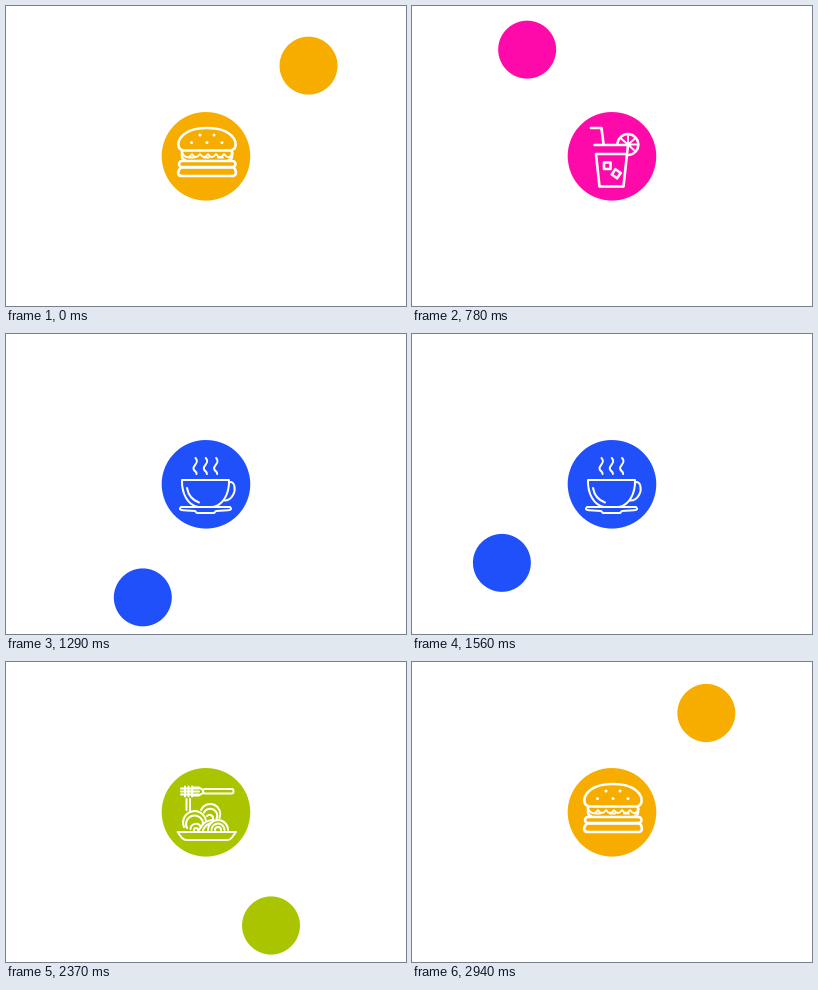
Recreate the animation shown at these times as an HTML page. Size 400x300 px, loop 2970 ms.

```html
<!DOCTYPE html>
<html lang="en">
<head>
<meta charset="utf-8">
<title>Menu blobs</title>
<style>
  html, body { margin: 0; width: 100%; height: 100%; overflow: hidden; background: #fff; }
  svg { display: block; width: 400px; height: 300px; }
  .icon { fill: none; stroke: #fff; stroke-width: 2; stroke-linecap: round; stroke-linejoin: round; }
  .bold { stroke-width: 2.6; }
  .fine { stroke-width: 1.8; }
  .dot { fill: #fff; stroke: none; }
</style>
</head>
<body>
<svg viewBox="0 0 400 300">
  <defs>
    <filter id="goo" filterUnits="userSpaceOnUse" x="0" y="0" width="400" height="300" color-interpolation-filters="sRGB">
      <feGaussianBlur stdDeviation="5"/>
      <feColorMatrix values="1 0 0 0 0  0 1 0 0 0  0 0 1 0 0  0 0 0 12 -5.5"/>
    </filter>
    <linearGradient id="tint" gradientUnits="userSpaceOnUse" x1="75" y1="0" x2="-75" y2="0">
      <stop/><stop offset=".25"/><stop offset=".75"/><stop offset="1"/>
    </linearGradient>
  </defs>

  <g filter="url(#goo)">
    <g id="stage" fill="url(#tint)">
      <circle id="main"/>
      <circle class="ball"/><path class="neck"/>
      <circle class="ball"/><path class="neck"/>
    </g>
  </g>

  <!-- burger -->
  <g class="icon bold">
    <path d="M177 144.500C171 143 171.500 136 174.500 132C180 124.500 190 122 201 122S222 124.500 227.500 132C230.500 136 231 143 225 144.500Z"/>
    <path d="M176 145V150Q176 153.500 179 154M226 145V150Q226 153.500 223 154"/>
    <path class="fine" d="M176 147q5 8 10 1q4 6 8 0q4 6 8 0q4 6 8 0q4 6 8 0q5 7 9-1M183 151.500h5M198 151.500h5M212 151.500h5"/>
    <rect x="173" y="155" width="56.500" height="6" rx="3"/>
    <path d="M175 161.500H228Q230.500 165 229.800 168Q229 170 226 170H176Q173 170 172.300 168Q171.500 165 175 161.500Z"/>
    <g class="dot">
      <circle cx="194" cy="129" r="1.500"/><circle cx="208" cy="129" r="1.500"/>
      <circle cx="185.500" cy="136.500" r="1.500"/><circle cx="201" cy="136.500" r="1.500"/><circle cx="216" cy="136.500" r="1.500"/>
    </g>
  </g>

  <!-- iced drink -->
  <g class="icon bold">
    <path d="M179 122H189.500L191.500 138"/>
    <path d="M182.500 139H216L211.500 180.500H187.500L184 148H214"/>
    <path d="M205.500 137A10.500 10.500 0 1 1 217 149"/>
    <path class="fine" d="M216 138.500V130M216 138.500L209 132.500M216 138.500L223 132.500M216 138.500H225M216 138.500L223 145"/>
    <rect x="192" y="156.500" width="6.500" height="6.500"/>
    <rect x="201" y="164.500" width="6.500" height="6.500" transform="rotate(35 204.250 167.750)"/>
  </g>

  <!-- coffee -->
  <g class="icon">
    <path d="M176 146H223C223.500 160 217 171 207 173H192C182 171 175.500 160 176 146Z"/>
    <path d="M223 148.500C229 146 230 156 227 161Q224 166.500 218.500 166.500"/>
    <path d="M181 154Q183 165 193 168.500"/>
    <path d="M175 173H224Q227 176 222 176.300L210 177L208 179H191L189 177L177 176.300Q172 176 175 173Z"/>
    <path id="steam" d="M189.500 124C194 129 187 131 187.500 134.500S191 137 190.500 140"/>
    <use href="#steam" x="10.300"/><use href="#steam" x="20.600"/>
  </g>

  <!-- pasta -->
  <g class="icon">
    <rect x="197" y="127" width="30.500" height="4.500" rx="2"/>
    <path d="M187 125.500H193L197 128V131L193 133.500H187"/>
    <path d="M175 126.500H193M175 129.500H193M175 132.500H193M179 124.500V134.500M182.500 124.500V134.500M186 124.500V134.500"/>
    <path d="M180.500 137V148M184 137V149"/>
    <path d="M178 165A11.500 11.500 0 1 1 200 159M181 166A8.500 8.500 0 1 1 197 162M184.500 167A5.500 5.500 0 0 1 195 165M188 168A2 2 0 0 1 192 168"/>
    <path d="M195 148A9.500 9.500 0 0 1 213.500 156M198 150.500A6.500 6.500 0 0 1 210.500 157M201 154A3.500 3.500 0 0 1 207 157"/>
    <path d="M202 168A10 10 0 0 1 222 168M205.500 168A6.500 6.500 0 0 1 218.500 168M209 168A3 3 0 0 1 215 168"/>
    <path d="M193 168Q198 158 207 158M197 168Q200 162 205 161"/>
    <path d="M171.500 170H230L225.500 176Q224 178 221 178H181Q178 178 176 176Z"/>
  </g>
</svg>

<script>
  const LOOP = 2970, STAGE = 750, MIRROR = 40;
  const COLORS = [[247, 173, 0], [255, 10, 170], [31, 80, 250], [170, 197, 0]];

  const all = s => [...document.querySelectorAll(s)];
  const stage = document.getElementById('stage'), main = document.getElementById('main');
  const balls = all('.ball'), necks = all('.neck'), stops = all('stop'), icons = all('.icon');

  const ramp = (a, b, t) => Math.min(1, Math.max(0, (t - a) / (b - a)));
  const smooth = (a, b, t) => { const x = ramp(a, b, t); return x * x * (3 - 2 * x); };

  function set(el, attrs) {
    for (const key in attrs) el.setAttribute(key, attrs[key]);
  }

  // A drop-shaped loop out of the centre and back, symmetric about the diagonal.
  function ballAt(u) {
    const w = Math.min(500, Math.abs(u + MIRROR));
    const along = 137 * Math.cos(Math.PI / 2 * (w / 500) ** 1.2);
    const across = Math.sign(u + MIRROR) * 42.4 * Math.sin(Math.PI * w / 520) ** 1.15;
    return {
      x: (along + across) * Math.SQRT1_2,
      y: (across - along) * Math.SQRT1_2,
      r: 29.4 - 4.8 * smooth(200, 300, w)
    };
  }

  // The body swells while it is hit, then recoils.
  function bodyRadius(v) {
    return 44.6 + 5 * Math.sin(2 * Math.PI * ramp(260, 475, v) ** 1.8);
  }

  // Outer tangents between body and ball, pinched inwards as they part.
  function neckPath({ x, y, r }, body) {
    const d = Math.hypot(x, y);
    if (d <= body - r || d > 97) return '';
    const cos = (body - r) / d, sin = Math.sqrt(1 - cos * cos);
    const pinch = Math.max(0, (d - 76) * 1.9);
    const at = (along, side) => `${(x * along - y * side) / d} ${(y * along + x * side) / d}`;
    const near = body * cos, far = d + r * cos;
    const mid = (near + far) / 2, waist = (body + r) / 2 * sin - pinch;
    return `M${at(near, body * sin)}Q${at(mid, waist)} ${at(far, r * sin)}` +
      `L${at(far, -r * sin)}Q${at(mid, -waist)} ${at(near, -body * sin)}Z`;
  }

  function drawBall(i, b, body) {
    set(balls[i], { cx: b.x, cy: b.y, r: b.r });
    set(necks[i], { d: neckPath(b, body) });
  }

  function draw(t) {
    const s = Math.floor(t / STAGE), v = t - s * STAGE, next = (s + 1) % 4;
    const body = bodyRadius(v), out = ballAt(v - STAGE);
    set(stage, { transform: `translate(200 150.3) rotate(${-90 * s})` });
    set(main, { r: body });
    drawBall(0, ballAt(v), body);
    drawBall(1, { x: out.y, y: -out.x, r: out.r }, body);

    const mix = k => `rgb(${COLORS[s].map((c, i) => Math.round(c + (COLORS[next][i] - c) * k))})`;
    const middle = ramp(235, 470, v);
    [ramp(330, 480, v), middle, middle, ramp(270, 345, v)].forEach((k, i) =>
      set(stops[i], { 'stop-color': mix(k) }));

    // The first icon change comes a little later than the others.
    const fade = s === 0 ? v - 60 : v;
    icons.forEach((icon, i) => {
      icon.style.opacity = i === s ? 1 - ramp(360, 460, fade) : i === next ? ramp(330, 440, fade) : 0;
    });
  }

  const start = performance.now();
  function tick() {
    draw((performance.now() - start) % LOOP);
    requestAnimationFrame(tick);
  }
  draw(0);
  requestAnimationFrame(tick);
</script>
</body>
</html>
```
